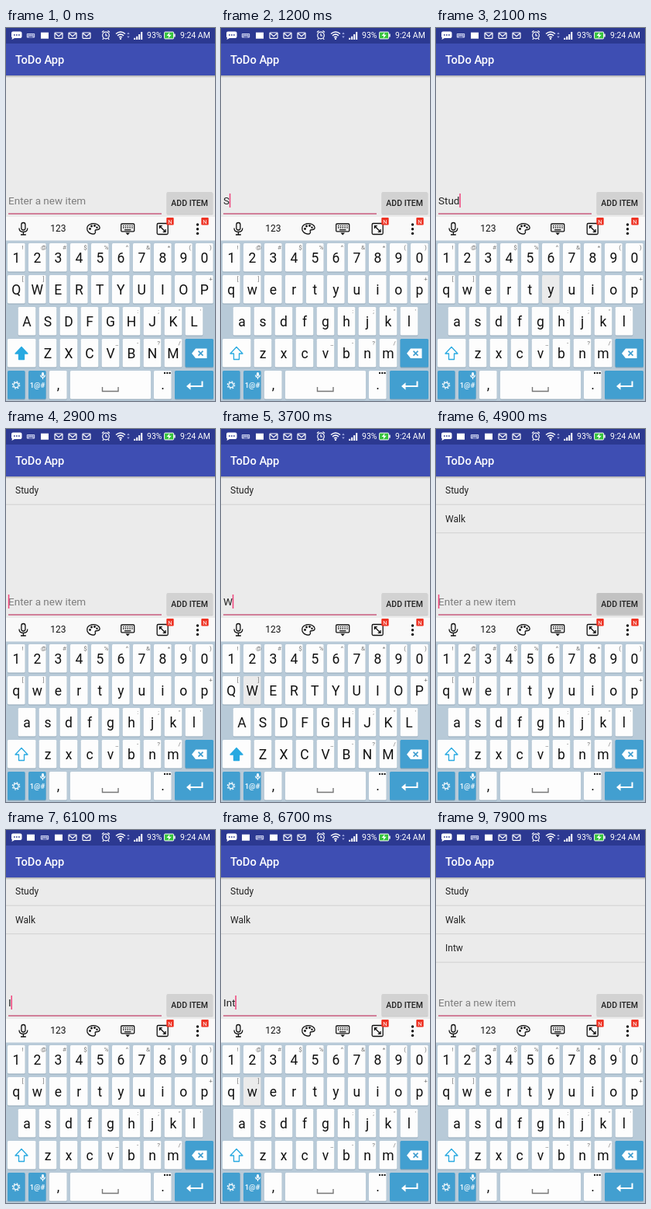
These frames come from a looping animation (270x480 px, 8 s). An HTML page:

```html
<!DOCTYPE html>
<html lang="en">
<head>
<meta charset="utf-8">
<title>ToDo App</title>
<style>
html, body { margin: 0; width: 100%; height: 100%; overflow: hidden; background: #ebebeb; }
svg { display: block; width: 100vw; height: 100vh; font-family: Roboto, sans-serif; }
text { white-space: pre; }
.mid { text-anchor: middle; }
.key { fill: #fdfdfd; }
.key.down { fill: #ebebeb; }
.blue { fill: #429fd0; }
.cap { font-size: 17.5px; fill: #111; text-anchor: middle; }
.alt { font-size: 8px; fill: #777; text-anchor: middle; }
.line { fill: none; stroke: #111; stroke-width: 1.3; }
.white { fill: none; stroke: #fff; stroke-width: 1.2; }
</style>
</head>
<body>
<svg id="stage" viewBox="0 0 270 480">
  <defs>
    <linearGradient id="shade" x1="0" y1="0" x2="0" y2="1">
      <stop offset="0" stop-color="#000" stop-opacity=".28"/>
      <stop offset="1" stop-color="#000" stop-opacity="0"/>
    </linearGradient>
    <g id="mail">
      <rect x="-5" y="-3.7" width="10" height="7.4" rx=".8" class="white"/>
      <path d="M-4.6-3 0 1 4.6-3" class="white"/>
    </g>
    <rect id="square" x="-5" y="-4" width="10" height="8" fill="#fff"/>
    <g id="board">
      <rect x="-5.2" y="-2.8" width="10.4" height="5.6" rx=".8" fill="#c3c9ea"/>
      <path d="M-4-1.1H4M-4 .5H4" stroke="#2c3991" stroke-width=".9" stroke-dasharray="1 .75"/>
      <path d="M-2.4 1.9H2.4" stroke="#2c3991" stroke-width=".8"/>
    </g>
    <g id="badge">
      <rect x="-4.7" y="-4.7" width="9.4" height="9.4" rx="1" fill="#ee3324"/>
      <text y="2.8" class="mid" font-size="7.5" fill="#fff">N</text>
    </g>
  </defs>

  <rect width="270" height="480" fill="#ebebeb"/>

  <g id="list"></g>

  <rect y="20" width="270" height="41" fill="#3e4eb3"/>
  <rect y="61" width="270" height="3" fill="url(#shade)"/>
  <text x="12" y="45.5" font-size="14.7" font-weight="500" fill="#fff">ToDo App</text>

  <rect width="270" height="20" fill="#2c3991"/>
  <path d="M9 4.5h9.500a2 2 0 0 1 2 2v4.500a2 2 0 0 1-2 2H11l-3.500 2 .5-2.500a2 2 0 0 1-1-1.500V6.500a2 2 0 0 1 2-2z" fill="#fff"/>
  <path d="M10 9h8" stroke="#2c3991" stroke-width="1.7" stroke-dasharray="1.700 1.300"/>
  <g id="tray"></g>
  <g class="white">
    <circle cx="129" cy="9.500" r="4.300"/>
    <path d="M129 7v3h2.200M124 5.500l2.500-2M134 5.500l-2.500-2M126 13.300l-1.200 1.500M132 13.300l1.200 1.500"/>
    <path d="M142 7.500q6-5 12 0M144 9.800q4-3.300 8 0M146 12q2-1.600 4 0" stroke-width="1.600"/>
  </g>
  <circle cx="148" cy="13.800" r="1.200" fill="#fff"/>
  <path d="M156.300 8l1.700-2.500L159.700 8zM156.300 10.500h3.400L158 13z" fill="#9ba5df"/>
  <path d="M166.200 15v-2.300M169.200 15v-4.300" stroke="#fff" stroke-width="2"/>
  <path d="M172.200 15V8M175.200 15V5" stroke="#fff" stroke-width="2"/>
  <g fill="#fff" font-size="10.5">
    <text x="182" y="13.2">93%</text>
    <text x="225" y="13.2">9:24 AM</text>
  </g>
  <rect x="204.600" y="5.100" width="12" height="8.800" rx="1" fill="#35c33c" stroke="#fff"/>
  <rect x="217.200" y="7.500" width="1.500" height="4" fill="#fff"/>
  <path d="M211.500 5.500 207.500 10h2.700l-.7 3.500 4.200-4.700H211z" fill="#fff"/>

  <text id="field" x="3" y="227" font-size="13.5"></text>
  <rect x="3" y="238.300" width="198" height="1.500" fill="#c95c7e"/>
  <rect id="caret" y="213" width="1.500" height="18" fill="#f0437c"/>
  <rect x="207.500" y="212" width="60" height="28.500" rx="1.500" fill="#000" opacity=".13"/>
  <rect id="add" x="207.500" y="211" width="59.500" height="28" rx="1.500"/>
  <text x="237.200" y="229.200" class="mid" font-size="10.5" font-weight="500" fill="#222">ADD ITEM</text>

  <rect y="243" width="270" height="31" fill="#f9f9f9"/>
  <rect x="19.900" y="250.500" width="5" height="9.500" rx="2.500" class="line"/>
  <path d="M17 257.500q0 5 5.400 5t5.400-5M22.400 262.500v3.500M19 266h6.800" class="line"/>
  <text x="67.300" y="262.300" class="mid" font-size="12" fill="#111">123</text>
  <path d="M105 260q-1.500-6 5-8 7-1.500 10.500 3 2 4-2.500 4.500-4 0-2.500 3 0 3-4 2.500-5-.7-6.500-5z" class="line"/>
  <g fill="#111">
    <circle cx="108.500" cy="258.500" r="1.400"/><circle cx="110.500" cy="255" r="1.400"/>
    <circle cx="114.500" cy="254.500" r="1.400"/><circle cx="117.500" cy="256.700" r="1.200"/>
    <circle cx="247.500" cy="253" r="1.700"/><circle cx="247.500" cy="258.700" r="1.700"/>
    <circle cx="247.500" cy="264.400" r="1.700"/>
    <path d="M154.500 263.500h5.500l-2.800 3z"/>
  </g>
  <rect x="148.700" y="252" width="17" height="9.800" rx="1" class="line"/>
  <path d="M151 254.700h13M151 257h13" class="line" stroke-dasharray="1.500 1.300"/>
  <path d="M153 259.700h8.500" class="line"/>
  <rect x="195.200" y="251.500" width="14" height="14" rx="1.500" class="line"/>
  <path d="M198.800 255l6.800 7M198.500 258v-3.300h3.300M206 259v3.300h-3.300" class="line"/>
  <use href="#badge" x="212" y="248.800"/>
  <use href="#badge" x="257" y="248.800"/>

  <rect y="273.500" width="270" height="206.500" fill="#b8cad8"/>
  <g id="keys"></g>
  <path id="shift" d="M20 410.500 28 419h-4.500v7.500h-7V419H12z" stroke="#27a9e1" stroke-width="1.300" stroke-linejoin="round"/>
  <path d="M240 418.700l5-6.200h14.500v12.400H245z" fill="#fff"/>
  <path d="M248.500 415.700l6 6M254.500 415.700l-6 6" stroke="#429fd0" stroke-width="1.700"/>
  <circle cx="13" cy="459.500" r="3.100" class="white" stroke-width="1.800"/>
  <circle cx="13" cy="459.500" r="4.700" class="white" stroke-dasharray="1.850 1.840"/>
  <text x="40.500" y="463.300" class="mid" font-size="9.5" font-weight="500" fill="#fff">1@#</text>
  <rect x="46" y="443" width="3" height="5" rx="1.500" fill="#fff"/>
  <path d="M44.700 446.500q0 3 2.800 3t2.800-3M47.500 449.500v2.500" class="white" stroke-width=".8"/>
  <path d="M124.500 462v5.500h20.500V462" fill="none" stroke="#777" stroke-width="1.400"/>
  <path d="M204 444h9" stroke="#111" stroke-width="2" stroke-dasharray="2 1.300"/>
  <path d="M253.500 454.500v6.500H236" fill="none" stroke="#fff" stroke-width="2"/>
  <path d="M238.500 456.300v9.400l-5.500-4.700z" fill="#fff"/>
</svg>
<script>
const $ = id => document.getElementById(id);
const LOOP = 8000, HINT = 'Enter a new item';
const keys = {}, caps = [];

function make(tag, parent, attrs, label) {
  const el = document.createElementNS('http://www.w3.org/2000/svg', tag);
  for (const k in attrs) el.setAttribute(k, attrs[k]);
  if (label) el.textContent = label;
  parent.appendChild(el);
  return el;
}

function addKey(x, y, w, kind = 'key') {
  make('rect', $('keys'), { x, y: y + 1, width: w, height: 36.5, rx: 1.5, fill: '#91a7b8' });
  return make('rect', $('keys'), { x, y, width: w, height: 36.5, rx: 1.5, class: kind });
}

// letters, first key centre, top edge, corner symbols
const rows = [
  ['1234567890', 13.3, 277, '!@#$%^&*()'],
  ['qwertyuiop', 13.3, 318, '[]       +'],
  ['asdfghjkl', 27, 359, '     :;"\''],
  ['zxcvbnm', 54, 400, '   _-?/']
];
for (const [letters, x0, y, alts] of rows) {
  [...letters].forEach((ch, i) => {
    const x = x0 + 27 * i;
    keys[ch] = addKey(x - 11.3, y, 22.6);
    caps.push([make('text', $('keys'), { x, y: y + 25, class: 'cap' }), ch]);
    if (alts[i] !== ' ') make('text', $('keys'), { x: x + 8.2, y: y + 8, class: 'alt' }, alts[i]);
  });
}
keys.shift = addKey(2, 400, 36.5);
addKey(231.5, 400, 36.5, 'blue');
addKey(2, 441, 22.6, 'blue');
addKey(29, 441, 22.6, 'blue');
addKey(56, 441, 22.6);
addKey(83, 441, 104);
addKey(191, 441, 22.6);
addKey(218, 441, 50, 'blue');
make('text', $('keys'), { x: 67.5, y: 465, class: 'cap' }, ',');
make('text', $('keys'), { x: 202.5, y: 465, class: 'cap' }, '.');

const items = ['Study', 'Walk', 'Intw'].map((name, i) => {
  const g = make('g', $('list'), {});
  make('text', g, { x: 12, y: 83.3 + 36.5 * i, 'font-size': 12, fill: '#212121' }, name);
  make('rect', g, { y: 96.7 + 36.5 * i, width: 270, height: 1, fill: '#d0d0d0' });
  return g;
});

const trays = [
  ['board', 'square', 'mail', 'mail', 'mail'],
  ['square', 'board', 'square', 'mail', 'mail']
].map(icons => {
  const g = make('g', $('tray'), {});
  icons.forEach((id, i) => make('use', g, { href: '#' + id, x: 32 + 18 * i, y: 9.7 }));
  return g;
});

const steps = [
  [0, { text: '', upper: true, key: '', items: 0, caret: false, add: false, tray: 0 }],
  [100, { caret: true }],
  [600, { caret: false }]
];
const at = (t, change) => steps.push([t, change]);

// press, show the letter, release
function type(t, key, text) {
  at(t, { key });
  at(t + 100, { text, caret: true });
  at(t + 200, { key: '', upper: false });
}
function addItem(t, count, off) {
  at(t, { add: true });
  at(t + 100, { text: '', items: count, caret: true });
  at(t + 300, { add: false });
  at(off, { caret: false });
}
function shift(t) {
  at(t, { key: 'shift' });
  at(t + 100, { upper: true });
  at(t + 200, { key: '' });
}

type(1000, 's', 'S');
type(1300, 't', 'St');
type(1600, 'u', 'Stu');
type(1900, 'd', 'Stud');
type(2100, 'y', 'Study');
addItem(2600, 1, 3200);
shift(3300);
type(3600, 'w', 'W');
type(3800, 'a', 'Wa');
type(4000, 'l', 'Wal');
type(4200, 'k', 'Walk');
at(4700, { tray: 1 });
addItem(4700, 2, 5400);
shift(5400);
type(5900, 'i', 'I');
type(6200, 'n', 'In');
type(6400, 't', 'Int');
type(6700, 'w', 'Intw');
at(7300, { caret: false });
addItem(7300, 3, 7900);
steps.sort((a, b) => a[0] - b[0]);

function draw(t) {
  const s = {};
  for (const [time, change] of steps) if (time <= t) Object.assign(s, change);

  const field = $('field');
  field.textContent = s.text || HINT;
  field.setAttribute('fill', s.text ? '#222' : '#7d7d7d');
  const width = s.text ? field.getComputedTextLength() : 0;
  $('caret').setAttribute('x', 2.8 + width);
  $('caret').style.display = s.caret ? '' : 'none';
  $('add').setAttribute('fill', s.add ? '#c2c2c2' : '#d2d2d2');
  $('shift').setAttribute('fill', s.upper ? '#27a9e1' : 'none');

  for (const k in keys) keys[k].classList.toggle('down', k === s.key);
  for (const [el, ch] of caps) el.textContent = s.upper ? ch.toUpperCase() : ch;
  items.forEach((g, i) => g.style.display = i < s.items ? '' : 'none');
  trays.forEach((g, i) => g.style.display = i === s.tray ? '' : 'none');
}

const start = performance.now();
let last = -1;
function tick() {
  const t = (performance.now() - start) % LOOP;
  const slot = Math.floor(t / 100);
  if (slot !== last) draw(slot * 100);
  last = slot;
  requestAnimationFrame(tick);
}
tick();
</script>
</body>
</html>
```
